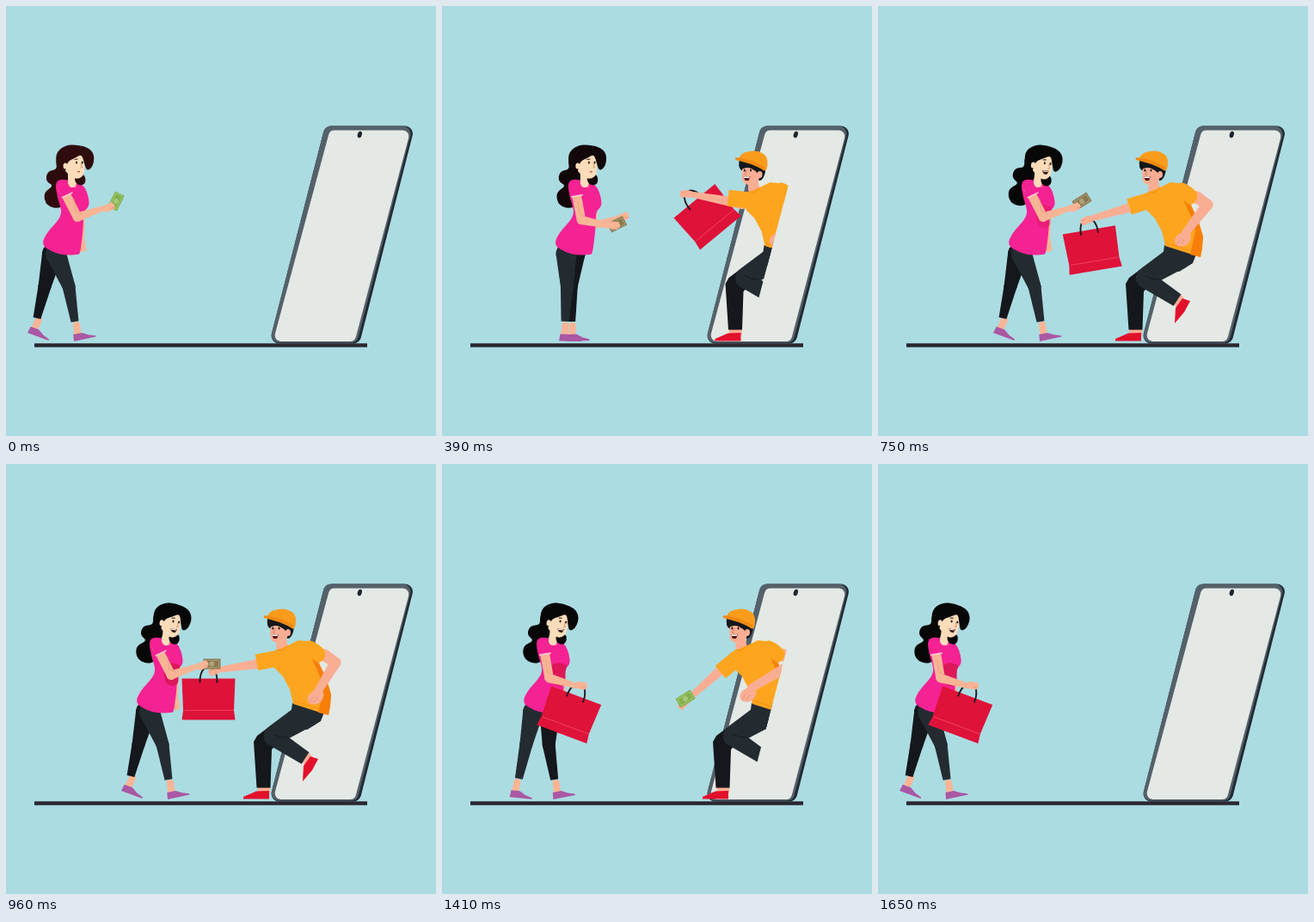
Animation of 500 by 500 pixels, one loop 1.83 s. Source, as an HTML page with a canvas:

```html
<!DOCTYPE html>
<html lang="en">
<head>
<meta charset="utf-8">
<title>Shopping by phone</title>
<style>
html, body { margin: 0; width: 100%; height: 100%; overflow: hidden; background: #abdce2; }
canvas { display: block; width: 500px; height: 500px; }
</style>
</head>
<body>
<canvas id="stage" width="500" height="500"></canvas>
<script>
const ctx = document.getElementById('stage').getContext('2d');
const LOOP = 1830, STEP = 30, LAST = 1650;
const SKIN = '#f8b596', FACE = '#fddcba', MAN_SKIN = '#f9ae94', CREASE = '#d98d73';
const PANTS = '#232b31', DARK = '#14171b', ORANGE = '#fda51f', AMBER = '#f77f09';
const SHIRT = '#f52293', SHOE = '#aa58a4', RED = '#df1239', SNEAKER = '#e3102c';
const BROWN_HAIR = [46, 12, 14], BLACK_HAIR = [8, 7, 8], GREEN = [128, 178, 76], BROWN = [138, 120, 80];

const clamp = v => Math.max(0, Math.min(1, v));
const mix = (a, b, u) => a.map((v, i) => v + (b[i] - v) * u);
const rgb = c => `rgb(${c.map(Math.round)})`;
// Eased 0..1 between two times, and a 0-1-0 bump
const ease = (t, a, b) => (1 - Math.cos(Math.PI * clamp((t - a) / (b - a)))) / 2;
const hump = (t, a, b) => Math.sin(Math.PI * clamp((t - a) / (b - a)));

// The whole pose follows from the time
function poseAt(t) {
  const p = {};
  p.walk = 109 * (ease(t, 10, 540) - ease(t, 1145, 1660));
  p.stride = t > 540 && t < 1110 ? 1 : Math.cos(2 * Math.PI * (t % 1110) / 540);
  p.slide = t < 800 ? 166 * Math.max(0, (540 - t) / 300) ** 2
                    : 27 * Math.max(0, (t - 1140) / 270) ** 3;

  const reach = hump(t, 0, 600), carry = ease(t, 960, 1160), low = Math.max(reach, carry);
  const raise = 1 - ease(t, 240, 540), lift = ease(t, 540, 960), drop = ease(t, 1200, 1410);
  const swap = ease(t, 810, 1110);

  p.hand = [119 - 10 * low, 235 + 23 * low];
  p.farHand = [88 + 37 * reach, 278 - 36 * reach];
  p.joy = ease(t, 400, 900) - hump(t, 1080, 1320);
  p.shade = lift;
  p.hair = rgb(mix(BROWN_HAIR, BLACK_HAIR, ease(t, 100, 540)));

  p.manHand = [243 + 11 * drop, 257 - 78 * raise - 17 * lift + 38 * drop];
  p.restHand = [349 + 11 * lift - 31 * drop, 270 - 3 * drop];

  const hers = [p.hand[0] + p.walk, p.hand[1]], his = [p.manHand[0] + p.slide, p.manHand[1]];
  const [bx, by] = mix(his, hers, swap);
  p.bag = [bx, by - 2, -19 - 41 * raise + 19 * lift + 20.5 * carry];
  const [cx, cy] = mix([hers[0] + 9 - 5 * low, hers[1] - 8 + 7 * low], [his[0] + 3 * drop - 1, his[1] - 2 - 3 * drop], swap);
  p.cash = [cx, cy, -64 * (1 - lift) + 42 * reach - 32 * drop];
  p.cashTone = rgb(mix(GREEN, BROWN, ease(t, 0, 420) - drop));
  return p;
}

function fillWith(color) {
  ctx.closePath();
  ctx.fillStyle = color;
  ctx.fill();
}

function poly(pts, fill) {
  ctx.beginPath();
  for (let i = 0; i < pts.length; i += 2) ctx.lineTo(pts[i], pts[i + 1]);
  fillWith(fill);
}

// Closed curve through the midpoints of a point list
function blob(pts, fill) {
  const n = pts.length / 2, p = i => [pts[(i % n) * 2], pts[(i % n) * 2 + 1]];
  const mid = i => mix(p(i), p(i + 1), .5);
  ctx.beginPath();
  ctx.moveTo(...mid(0));
  for (let i = 1; i <= n; i++) ctx.quadraticCurveTo(...p(i), ...mid(i));
  fillWith(fill);
}

// Slanted panel with rounded corners: left and right edge at top and bottom
function panel(topL, topR, lowL, lowR, top, low, r, fill) {
  const c = [[topL, top], [topR, top], [lowR, low], [lowL, low]];
  ctx.beginPath();
  ctx.moveTo(...mix(c[0], c[1], .5));
  for (let i = 1; i <= 4; i++) ctx.arcTo(...c[i % 4], ...c[(i + 1) % 4], r);
  fillWith(fill);
}

function line(pts, color, w) {
  ctx.beginPath();
  for (let i = 0; i < pts.length; i += 2) ctx.lineTo(pts[i], pts[i + 1]);
  ctx.strokeStyle = color;
  ctx.lineWidth = w;
  ctx.stroke();
}

function dot(x, y, rx, ry, fill, a = 0) {
  ctx.beginPath();
  ctx.ellipse(x, y, rx, ry, a, 0, 7);
  fillWith(fill);
}

// Tapered limb segment with a round start and, if wanted, a round end
function taper(x1, y1, w1, x2, y2, w2, fill, roundEnd = true) {
  const a = Math.atan2(y2 - y1, x2 - x1), nx = -Math.sin(a) / 2, ny = Math.cos(a) / 2;
  poly([x1 + nx * w1, y1 + ny * w1, x2 + nx * w2, y2 + ny * w2,
    x2 - nx * w2, y2 - ny * w2, x1 - nx * w1, y1 - ny * w1], fill);
  dot(x1, y1, w1 / 2, w1 / 2, fill);
  if (roundEnd) dot(x2, y2, w2 / 2, w2 / 2, fill);
}

function placed(x, y, deg, draw) {
  ctx.save();
  ctx.translate(x, y);
  ctx.rotate(deg * Math.PI / 180);
  draw();
  ctx.restore();
}

function turned(x, y, deg, draw) {
  placed(x, y, deg, () => placed(-x, -y, 0, draw));
}

const angle = (x1, y1, x2, y2) => Math.atan2(y2 - y1, x2 - x1) * 180 / Math.PI;

function palm(x, y, deg, fill) {
  placed(x, y, deg, () => {
    blob([-7, -4, 2, -5, 8, -4, 8, 2, 3, 4, -6, 4], fill);
    line([1, -3, 6, -5], fill, 2);
    line([2, 1, 7, 1], CREASE, .6);
  });
}

function phone() {
  panel(371, 475.5, 306, 411, 139.5, 392.5, 9, '#232a33');
  panel(371, 473, 306, 408, 139.5, 391.5, 9, '#55616a');
  panel(376.5, 470.5, 310.5, 405.5, 144.5, 390, 7, '#e4e9e5');
  dot(411.3, 149.5, 2.5, 3.8, '#20242d', .3);
  ctx.fillStyle = '#292630';
  ctx.fillRect(33, 392.3, 387, 4.4);
}

// s runs from -1 (leg behind) to 1 (leg in front)
function leg(s, hip, lift, fill) {
  const back = Math.min(0, s), knee = 59 + 14 * s, ankle = 58 + 22 * s;
  const pitch = s > 0 ? -12 * s : -20 * s * lift;
  placed(ankle - 6 + 5 * s, 390 + 10 * back * lift, pitch, () => {
    taper(7, -18, 8, 6, -6, 8, SKIN);
    poly([0, 0, 1, -8, 11, -8, 18, -4, 26, -1.5, 26, 0], SHOE);
  });
  taper(hip, 288, 24, knee, 326, 15, fill);
  taper(knee, 326, 15, ankle, 367 + 4 * back * lift, 9, fill, false);
}

function womanHead(p) {
  const hair = p.hair;
  taper(77, 194, 10, 77, 206, 10, FACE);
  blob([79, 197, 91, 195, 93, 204, 89, 209, 81, 207], hair);
  blob([67, 174, 92, 170, 91, 186, 91, 196, 84, 202, 74, 198, 66, 188], FACE);
  blob([60, 190, 57, 172, 68, 162, 82, 161, 97, 165, 103, 174, 101, 187, 94, 192, 91, 183, 88, 172, 80, 177, 71, 181, 69, 195], hair);
  dot(69, 186, 2.5, 3.5, FACE);
  for (const x of [82, 88.7]) dot(x, 182, 1, 1.5, '#201510');
  line([79.5, 178.5, 83.5, 178], hair, .9);
  line([87, 183, 88.5, 187.5, 86.5, 188], '#b97a5a', .7);
  if (p.joy > .1) {
    poly([80, 191, 88, 190.5, 86, 195, 82.5, 194.5], '#3a1210');
    line([81, 191.6, 87, 191.4], '#fff', 1);
  } else line([83, 193, 86, 192.5], '#9b2f2f', 1.2);
}

function womanBody(p) {
  const [fx, fy] = p.farHand, tilt = 9 * p.joy;
  leg(-p.stride, 64 - 10 * p.stride, 1, DARK);
  leg(p.stride, 56 + 2 * p.stride, .3, PANTS);
  taper(87, 228, 8, 87, 255, 9, SKIN);
  taper(87, 255, 9, fx, fy, 6, SKIN);
  palm(fx, fy, angle(87, 255, fx, fy), SKIN);
  turned(78, 205, tilt, () => blob([70, 172, 57, 178, 60, 190, 48, 192, 46, 204, 56, 209, 43, 217,
    47, 233, 64, 236, 72, 224, 68, 208, 74, 200, 72, 186], p.hair));
  blob([57, 206, 63, 201, 74, 203, 85, 205, 92, 211, 96, 222, 97, 233, 90, 239, 90, 252, 89, 266,
    86, 288, 84, 289, 68, 290, 54, 286, 41, 278, 47, 264, 62, 248, 65, 238, 60, 224], SHIRT);
  ctx.globalAlpha = p.shade;
  blob([76, 230, 95, 233, 91, 240, 92, 258, 78, 258, 74, 245], '#dc1859');
  ctx.globalAlpha = 1;
  line([70, 206, 75, 210, 82, 210], '#f8b3cf', 1);
  turned(78, 205, tilt, () => womanHead(p));
}

function womanArm(p) {
  // Equal arm segments, so the elbow hangs below the middle
  const sx = 66, sy = 212, [hx, hy] = p.hand;
  const d = Math.hypot(hx - sx, hy - sy), bend = Math.sqrt(37.5 ** 2 - d * d / 4) / d;
  const ex = (sx + hx) / 2 - (hy - sy) * bend, ey = (sy + hy) / 2 + (hx - sx) * bend;
  taper(sx, sy, 11, ex, ey, 10.5, SKIN);
  taper(ex, ey, 10.5, hx - 5, hy, 6, SKIN);
  line([ex - 4, ey - 22, ex - 2, ey - 7, ex + 6, ey - 3], CREASE, .5);
  palm(hx, hy, angle(ex, ey, hx, hy), SKIN);
  placed(sx, sy - 3, angle(sx, sy - 3, ex, ey), () => {
    taper(0, 0, 13, 12, 0, 14, SHIRT, false);
    line([12, -7, 12, 7], '#fbd0de', 1.5);
  });
}

function manBody(p) {
  const [rx, ry] = p.restHand;
  // far leg
  poly([292, 374, 307, 374, 307, 382, 293, 382], MAN_SKIN);
  poly([276, 389.5, 276, 387, 291, 380.5, 306, 380, 306, 389.5], SNEAKER);
  poly([288, 323, 292, 316, 304, 307, 322, 318, 309, 332, 307.5, 376.5, 291.5, 376.5], DARK);
  // near leg
  poly([344, 346, 352, 335, 357, 342, 349, 352], MAN_SKIN);
  poly([345, 369, 346, 351, 354, 340, 363, 343, 356, 356], SNEAKER);
  taper(350, 291, 30, 312, 315, 23, PANTS);
  taper(310, 317, 21, 348, 342, 16, PANTS, false);
  poly([333, 278, 371, 286, 366, 299, 350, 309, 330, 300], PANTS);
  line([327, 318, 318, 317, 311, 314], '#10151a', .8);
  // torso
  taper(320, 200, 11, 321, 213, 13, MAN_SKIN);
  poly([313, 217, 328, 211, 340, 205, 350, 206, 371, 219, 364, 232, 372, 248, 378, 268, 377, 281, 375, 292,
    334, 279, 330, 262, 322, 247, 312, 237], ORANGE);
  poly([355, 225, 364, 232, 372, 248, 378, 268, 377, 281, 375, 292, 363, 289, 369, 262, 364, 245], AMBER);
  line([334, 275, 350, 280, 374, 288], AMBER, .6);
  line([314, 216, 321, 217, 328, 211], AMBER, .8);
  // resting arm
  taper(370, 222, 14, 383, 231, 13, MAN_SKIN);
  taper(383, 231, 13, rx + 3, ry - 6, 9, MAN_SKIN);
  blob([rx - 11, ry + 2, rx - 3, ry - 7, rx + 8, ry - 8, rx + 10, ry, rx + 5, ry + 9, rx - 7, ry + 10], MAN_SKIN);
  for (const dx of [-7, -2]) line([rx + dx, ry + 7, rx + dx + 4, ry + 1], CREASE, .7);
  blob([348, 204, 360, 207, 374, 219, 366, 233, 352, 224], ORANGE);
  manHead();
}

function manHead() {
  blob([303, 182, 306, 176, 330, 178, 336, 190, 331, 203, 325, 203, 320, 192, 306, 193], DARK);
  blob([308, 186, 318, 182, 327, 190, 328, 204, 318, 209, 308, 206, 307, 195], MAN_SKIN);
  blob([304, 180, 318, 179, 334, 185, 334, 194, 327, 197, 324, 192, 314, 187, 304, 191], DARK);
  dot(328, 196, 3, 4, MAN_SKIN);
  for (const x of [310.3, 317.5]) dot(x, 191, 1, 1.5, DARK);
  line([313, 191, 310.5, 196, 313, 197], '#c66f55', .8);
  poly([309, 198.5, 317, 198.5, 315, 203, 311, 203], '#5a1414');
  line([309.5, 199.2, 316, 199.2], '#fff', 1.4);
  blob([303, 180, 306, 172, 316, 168.5, 327, 168.5, 337, 175, 337, 188, 334, 193, 326, 186, 312, 181], '#fa9c1b');
  poly([299.5, 176.3, 306, 176.5, 320, 180, 334, 187, 333, 190.5, 318, 184, 306, 180.5, 300, 179], '#ef8a12');
}

function manArm(p) {
  const [hx, hy] = p.manHand, a = angle(316, 226, hx, hy);
  taper(308, 230, 12.5, hx, hy, 6, MAN_SKIN);
  palm(hx, hy, a, MAN_SKIN);
  placed(316, 226, a, () => taper(0, 0, 19, 25, 0, 19, ORANGE, false));
}

function bag(x, y, deg) {
  placed(x, y, deg, () => {
    poly([-31, 14, 31, 14, 29.5, 51, 31, 62, -31, 62, -29.5, 51], RED);
    line([-28, 51, 29, 51], '#f4506a', .7);
    ctx.beginPath();
    ctx.moveTo(-10, 19);
    ctx.bezierCurveTo(-11, -6, 11, -6, 10, 19);
    ctx.strokeStyle = '#1d1a1d';
    ctx.lineWidth = 1.9;
    ctx.stroke();
  });
}

function cash(x, y, deg, color) {
  placed(x, y, deg, () => {
    ctx.fillStyle = color;
    ctx.fillRect(-10, -6, 20, 12);
    ctx.strokeStyle = 'rgba(235,232,190,.35)';
    ctx.lineWidth = 1;
    ctx.strokeRect(-8.2, -4.2, 16.4, 8.4);
    dot(0, 0, 3, 3, 'rgba(240,238,200,.35)');
  });
}

function draw(t) {
  const p = poseAt(t);
  const shifted = (dx, part) => placed(dx, 0, 0, () => part(p));
  ctx.fillStyle = '#abdce2';
  ctx.fillRect(0, 0, 500, 500);
  phone();
  ctx.save();
  // Everything right of this slanted line is still inside the phone
  ctx.beginPath();
  ctx.moveTo(0, 0);
  ctx.lineTo(457.3, 0);
  ctx.lineTo(326.3, 500);
  ctx.lineTo(0, 500);
  ctx.clip();
  shifted(p.slide, manBody);
  shifted(p.walk, womanBody);
  bag(...p.bag);
  shifted(p.slide, manArm);
  cash(...p.cash, p.cashTone);
  shifted(p.walk, womanArm);
  ctx.restore();
}

const start = performance.now();
function tick() {
  const t = Math.max(0, performance.now() - start) % LOOP;
  draw(Math.min(LAST, Math.floor(t / STEP) * STEP));
  requestAnimationFrame(tick);
}
tick();
</script>
</body>
</html>
```
